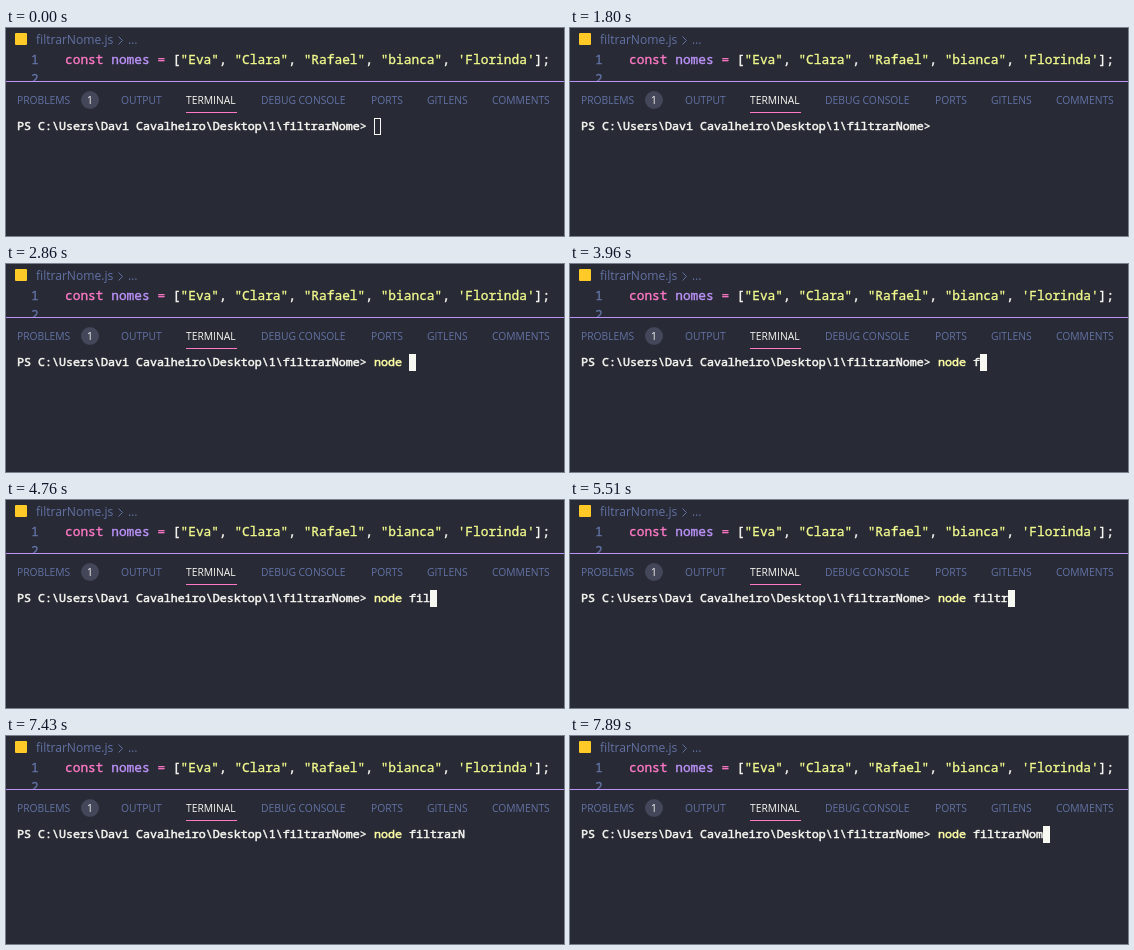
Animation of 558x208 px, one loop 8000 ms. Source, as an HTML page:

```html
<!DOCTYPE html>
<html lang="pt">
<head>
<meta charset="utf-8">
<style>
  html, body { margin: 0; width: 100%; height: 100%; overflow: hidden; background: #282a36; }
  svg { display: block; }
  text { white-space: pre; }
  .ui { font-family: "Open Sans", sans-serif; --ink: #6272a4; }
  .code, .term { font-family: "Noto Sans Mono", monospace; --ink: #f8f8f2; stroke-width: 0.35px; }
  .term { stroke-width: 0.5px; }
  .ui, .code, .term, tspan { fill: var(--ink); }
  .code, .term, tspan { stroke: var(--ink); }
  .crumb { font-size: 12.1px; }
  .tab { font-size: 10.3px; }
  .code { font-size: 12.83px; }
  .term { font-size: 11.667px; }
  .light { --ink: #f8f8f2; }
  .num { --ink: #6272a4; }
  .key { --ink: #ff79c6; }
  .var { --ink: #bd93f9; }
  .str { --ink: #f1fa8c; }
  .cmd { --ink: #ffffa5; }
</style>
</head>
<body>
<svg width="558" height="208" viewBox="0 0 558 208">
  <rect x="9" y="5" width="12" height="12" rx="1" fill="#ffca28"/>
  <text class="ui crumb" x="30" y="16">filtrarNome.js</text>
  <path d="M112.5 8.5l4 4-4 4" fill="none" stroke="#6272a4"/>
  <text class="ui crumb" x="122" y="16">…</text>

  <text class="code num" x="25" y="36">1</text>
  <text class="code" x="59" y="36"><tspan class="key">const</tspan> <tspan class="var">nomes</tspan> <tspan class="key">=</tspan> [<tspan class="str">"Eva"</tspan>, <tspan class="str">"Clara"</tspan>, <tspan class="str">"Rafael"</tspan>, <tspan class="str">"bianca"</tspan>, <tspan class="str">'Florinda'</tspan>];</text>
  <text class="code num" x="25" y="55">2</text>

  <rect y="53" width="558" height="155" fill="#282a36"/>
  <rect y="53" width="558" height="1" fill="#bd93f9"/>
  <g id="tabs"></g>
  <circle cx="84" cy="72" r="9" fill="#44475a"/>
  <text class="ui tab light" x="84" y="76" text-anchor="middle">1</text>
  <rect x="180" y="84" width="51" height="1" fill="#ff79c6"/>

  <text class="term" x="11" y="102">PS C:\Users\Davi Cavalheiro\Desktop\1\filtrarNome&gt;</text>
  <text class="term cmd" x="368" y="102" id="command"></text>
  <text class="term" x="403" y="102" id="argument"></text>
  <rect id="cursor" stroke="#f8f8f2" y="90.5" width="6" height="16"/>
</svg>
<script>
  const LOOP = 8000, FOCUS = 860, CELL = 7, PROMPT_END = 368;
  const LINE = "node filtrarNom";
  // [key press, echo]: the cursor is hidden between the two
  const KEYS = [
    [1800, 1870], [2140, 2200], [2400, 2460], [2660, 2660], [2860, 2860],
    [3960, 3960], [4490, 4560], [4700, 4760], [5170, 5170], [5420, 5510],
    [5760, 5760], [5980, 6050], [7020, 7020], [7430, 7490], [7830, 7890]
  ];
  const TABS = {
    PROBLEMS: 11, OUTPUT: 115, TERMINAL: 180, "DEBUG CONSOLE": 255,
    PORTS: 365, GITLENS: 421, COMMENTS: 486
  };
  const get = id => document.getElementById(id);
  const command = get("command"), argument = get("argument"), cursor = get("cursor");

  get("tabs").innerHTML = Object.entries(TABS).map(([name, x]) =>
    `<text class="ui tab ${name === "TERMINAL" ? "light" : ""}" x="${x}" y="76">${name}</text>`
  ).join("");

  function draw(now) {
    const t = now % LOOP;
    const typed = KEYS.filter(([, echo]) => t >= echo).length;
    const hidden = KEYS.some(([press, echo]) => t >= press && t < echo);
    command.textContent = LINE.slice(0, Math.min(typed, 4));
    argument.textContent = LINE.slice(5, Math.max(typed, 5));
    cursor.setAttribute("x", PROMPT_END + typed * CELL + 0.5);
    cursor.setAttribute("fill", t < FOCUS ? "none" : "#f8f8f2");
    cursor.setAttribute("visibility", hidden ? "hidden" : "visible");
  }

  const start = performance.now();
  function tick() {
    draw(performance.now() - start);
    requestAnimationFrame(tick);
  }
  tick();
</script>
</body>
</html>
```
